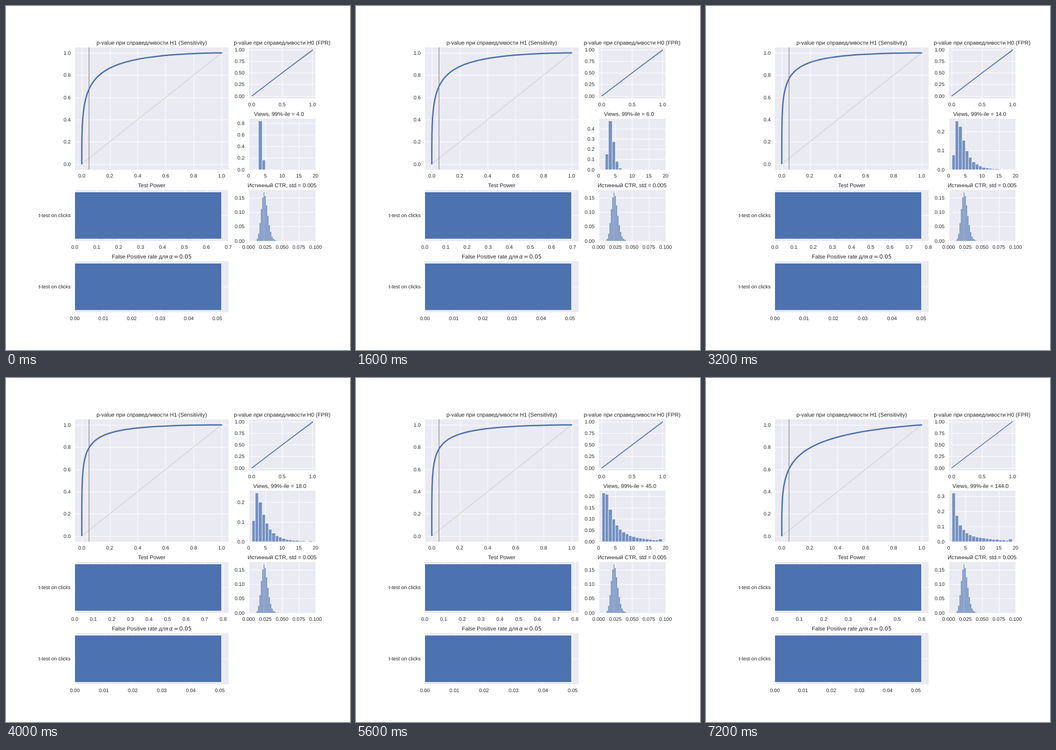
An HTML page that plays this animation: 748 px wide and 748 px high, repeating every 8000 ms.

```html
<!DOCTYPE html>
<html lang="ru">
<head>
<meta charset="utf-8">
<style>
html, body { margin: 0; width: 100%; height: 100%; overflow: hidden; background: #fff; }
svg { display: block; width: 748px; height: 748px; font: 11px "Liberation Sans", Arial, sans-serif; fill: #262626; text-rendering: geometricPrecision; }
.title { font-size: 12px; }
.math { font-family: "DejaVu Sans", sans-serif; }
.panel { fill: #eaeaf2; }
.grid { stroke: #fff; fill: none; }
.diag { stroke: #d3d3d3; fill: none; }
.alpha { stroke: #666; fill: none; }
.curve { stroke: #4c72b0; fill: none; stroke-linecap: round; stroke-linejoin: round; }
.bar { fill: #4c72b0; }
.hist { fill: #4c72b0; fill-opacity: .75; stroke: #fff; }
.state { visibility: hidden; animation: show 8s step-end infinite; }
@keyframes show { 0% { visibility: visible; } 10%, 100% { visibility: hidden; } }
</style>
</head>
<body>
<svg id="stage" viewBox="0 0 748 748"></svg>
<script>
const NS = 'http://www.w3.org/2000/svg';
const stage = document.getElementById('stage');

function add(parent, tag, attrs, content) {
  const el = document.createElementNS(NS, tag);
  for (const k in attrs) el.setAttribute(k, attrs[k]);
  if (content !== undefined) el.textContent = content;
  parent.appendChild(el);
  return el;
}
const label = (g, x, y, s, anchor = 'middle', cls = '') =>
  add(g, 'text', { x, y: Math.round(y), 'text-anchor': anchor, class: cls }, s);
const title = (g, a, s) => label(g, a.x + a.w / 2, a.y - 6, s, 'middle', 'title');
const path = (g, cls, points, width = 1) =>
  add(g, 'path', { class: cls, 'stroke-width': width,
    d: 'M' + points.map(p => p.map(v => v.toFixed(2)).join(' ')).join('L') });
const snap = v => Math.round(v) + .5;

// Rectangle with its edges on whole pixels
function rect(g, cls, x, y, right, bottom, line = 0) {
  [x, y, right, bottom] = [x, y, right, bottom].map(Math.round);
  add(g, 'rect', { class: cls, x, y, width: right - x, height: bottom - y, 'stroke-width': line });
}

function axes(x, y, w, h, [xa, xb], [ya, yb]) {
  return { x, y, w, h, xb, yb,
    X: v => x + (v - xa) / (xb - xa) * w,
    Y: v => y + h - (v - ya) / (yb - ya) * h };
}
const panel = a => rect(stage, 'panel', a.x, a.y, a.x + a.w, a.y + a.h);
const rowLine = (g, a, y) => path(g, 'grid', [[a.x, snap(y)], [a.x + a.w, snap(y)]]);

function xTicks(g, a, step, digits) {
  for (let i = 0; i * step <= a.xb + 1e-9; i++) {
    const x = a.X(i * step);
    path(g, 'grid', [[snap(x), a.y], [snap(x), a.y + a.h]]);
    label(g, x, a.y + a.h + 17.2, (i * step).toFixed(digits));
  }
}
function yTicks(g, a, step, digits) {
  for (let i = 0; i * step <= a.yb + 1e-9; i++) {
    const y = a.Y(i * step);
    rowLine(g, a, y);
    label(g, a.x - 9, y + 4, (i * step).toFixed(digits), 'end');
  }
}

// Normal distribution
function phi(z) {
  const t = 1 / (1 + .3275911 * Math.abs(z) / Math.SQRT2);
  const tail = t * (.254829592 + t * (-.284496736 + t * (1.421413741 + t * (-1.453152027 + t * 1.061405429)))) * Math.exp(-z * z / 2) / 2;
  return z < 0 ? tail : 1 - tail;
}
function quantile(p) {
  let lo = -6, hi = 6;
  for (let i = 0; i < 45; i++) {
    const mid = (lo + hi) / 2;
    if (phi(mid) < p) lo = mid; else hi = mid;
  }
  return lo;
}

// Layout: four rows, three columns; the left plots span two columns
const H = 110.75, COL = 145.4, GAP = 43.6, LEFT = 149.6;
const WIDE = 2 * COL + GAP, RIGHT = LEFT + WIDE + GAP;
const rowTop = row => 89.8 + row * H * 1.4;
const unit = [-.05, 1.05];
const sens = axes(LEFT, rowTop(0), WIDE, H * 2.4, unit, unit);
const fpr = axes(RIGHT, rowTop(0), COL, H, unit, unit);
const barAxes = (row, max) => axes(LEFT, rowTop(row), WIDE, H, [0, max], [-.5, .5]);
const viewAxes = max => axes(RIGHT, rowTop(1), COL, H, [0, 20], [0, max]);
const CTR_PEAK = .1688;
const ctr = axes(RIGHT, rowTop(2), COL, H, [0, .1], [0, CTR_PEAK * 1.05]);

// Binormal curve through the point (0.05, power)
function sensCurve(g, power, sigma) {
  const start = quantile(power), slope = .82 - .04 * sigma ** 2;
  const points = [];
  for (let u = -6; u <= 5; u += .1)
    points.push([sens.X(phi(u)), sens.Y(phi(start + slope * (u + 1.645)))]);
  points.push([sens.X(1), sens.Y(1)]);
  path(g, 'curve', points, 3);
}

// Diagonal that breaks into stairs towards its end
function nullCurve(g, sigma) {
  const stairs = Math.max(0, 1 - sigma ** 4 / 5);
  const points = [[fpr.X(0), fpr.Y(0)]];
  for (let x = 0; x < 1;) {
    const next = Math.min(1, x + .008 + .024 * stairs * x ** 5);
    if (stairs) points.push([fpr.X(next), fpr.Y(x)]);
    points.push([fpr.X(next), fpr.Y(next)]);
    x = next;
  }
  path(g, 'curve', points, 1.5);
}

function rateBar(g, row, value, step, digits) {
  const a = barAxes(row, value * 1.05);
  xTicks(g, a, step, digits);
  rowLine(g, a, a.Y(0));
  rect(g, 'bar', a.x, a.y + H / 22, a.X(value), a.y + H * 21 / 22);
}

function bins(g, a, values, start, width, line) {
  values.forEach((v, i) => {
    const x = start + i * width;
    if (v > .0005) rect(g, 'hist', a.X(x), a.Y(v), a.X(x + width), a.Y(0), line);
  });
}

// Views are 1 + a log-normal number, rounded down; the last bin holds 18 and 19
function viewBins(g, sigma) {
  const below = n => phi((Math.log(n) - 1) / sigma);
  const values = [];
  for (let n = 1; n <= 18; n++)
    values.push((below(n < 18 ? n : 19) - below(n - 1)) / below(19));
  const max = Math.max(...values) * 1.05;
  const step = max <= .25 ? .05 : max <= .51 ? .1 : .2;
  const a = viewAxes(max);
  yTicks(g, a, step, step < .1 ? 2 : 1);
  bins(g, a, values, 1, 1, .8);
  const percentile = 1 + Math.floor(Math.exp(1 + 2.326 * sigma));
  title(g, a, 'Views, 99%-ile = ' + percentile.toFixed(1).padEnd(7, '\u00a0'));
}

// Fixed parts
const views = viewAxes(1), power = barAxes(2, 1), falseRate = barAxes(3, 1);
[sens, fpr, power, falseRate, views, ctr].forEach(panel);
xTicks(stage, sens, .2, 1);
yTicks(stage, sens, .2, 1);
xTicks(stage, fpr, .5, 1);
yTicks(stage, fpr, .25, 2);
xTicks(stage, views, 5, 0);
xTicks(stage, ctr, .025, 3);
yTicks(stage, ctr, .05, 2);
for (const a of [sens, fpr]) path(stage, 'diag', [[a.X(0), a.Y(0)], [a.X(1), a.Y(1)]], 1.5);
path(stage, 'alpha', [[snap(sens.X(.05)), sens.y], [snap(sens.X(.05)), sens.y + sens.h]]);

// Gamma-shaped click rates
const ctrBins = [];
for (let i = 0; i < 16; i++) {
  const r = (.011 + i * .002) / .0231;
  ctrBins.push(CTR_PEAK * (r * Math.exp(1 - r)) ** 23.5);
}
bins(stage, ctr, ctrBins, .01, .002, .35);

title(stage, sens, 'p-value при справедливости H1 (Sensitivity)');
title(stage, fpr, 'p-value при справедливости H0 (FPR)');
title(stage, power, 'Test Power');
title(stage, ctr, 'Истинный CTR, std = 0.005');
const caption = label(stage, 230.2, falseRate.y - 6, 'False Positive rate для ', 'start', 'title');
add(caption, 'tspan', { x: 354.8, class: 'math', 'font-style': 'oblique' }, 'α');
add(caption, 'tspan', { x: 364.8, class: 'math' }, '=');
add(caption, 'tspan', { x: 376.8, class: 'math' }, '0.05');
for (const a of [power, falseRate]) label(stage, a.x - 9, a.Y(0) + 4, 't-test on clicks', 'end');

// Each step: spread of views, test power, false positive rate
const steps = [
  [.1, .668, .0514], [.2, .681, .0508], [.3, .6935, .0504], [.5, .715, .056], [.7, .763, .05],
  [.8, .79, .0505], [1, .811, .051], [1.2, .78, .0495], [1.5, .728, .0479], [1.705, .5977, .0519]
];
steps.forEach(([sigma, hit, miss], i) => {
  const g = add(stage, 'g', { class: 'state', style: `animation-delay:${(i * .8 - 8).toFixed(1)}s` });
  sensCurve(g, hit, sigma);
  nullCurve(g, sigma);
  rateBar(g, 2, hit, .1, 1);
  rateBar(g, 3, miss, .01, 2);
  viewBins(g, sigma);
});
</script>
</body>
</html>
```
